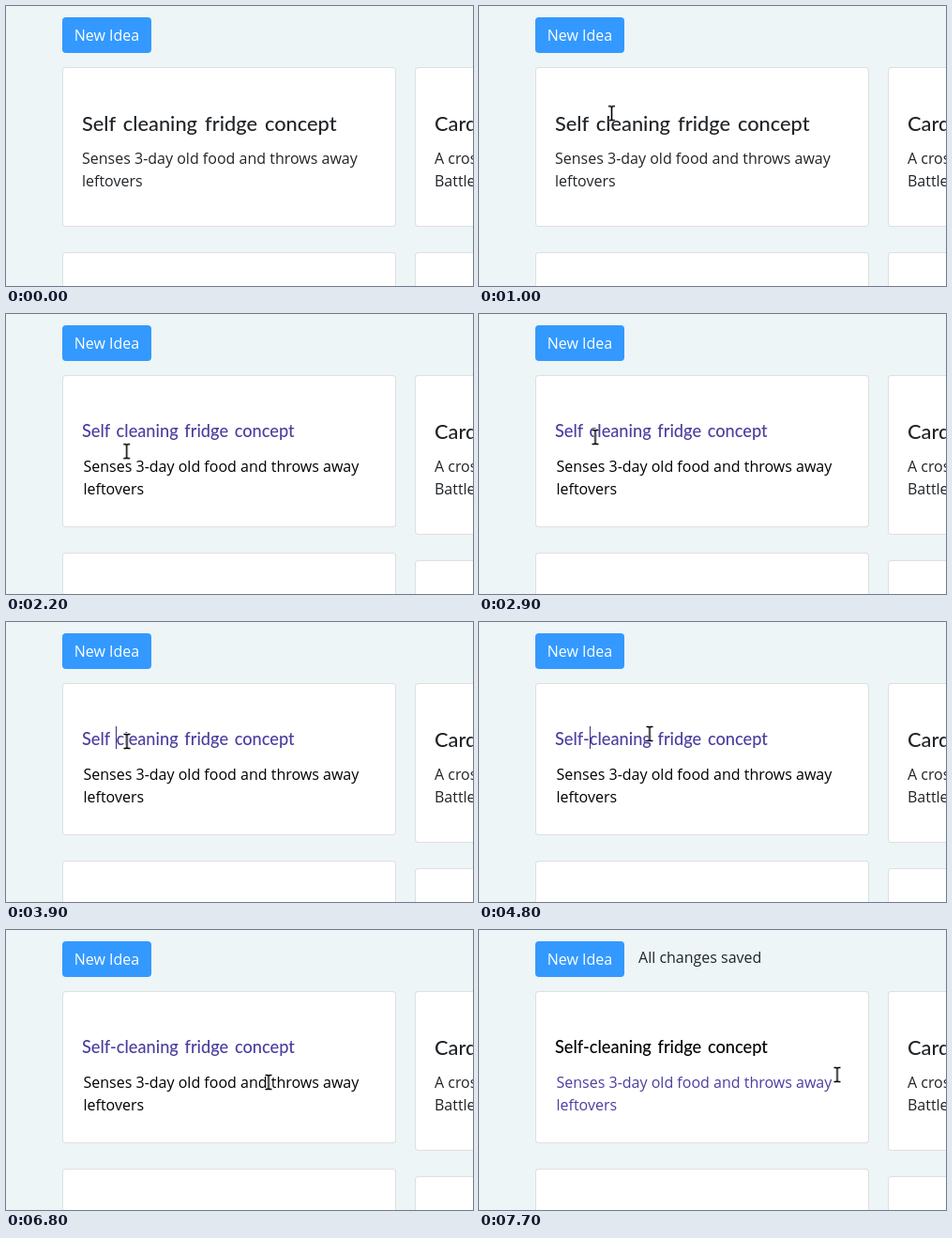
An HTML page for the animation above (8 s loop, 498 by 298 pixels).

```html
<!DOCTYPE html>
<html lang="en">
<head>
<meta charset="utf-8">
<title>Idea board</title>
<style>
html, body { margin: 0; width: 100%; height: 100%; overflow: hidden; background: #edf5f7; }
body { position: relative; font: 16px/24px "Open Sans", "Noto Sans", sans-serif; color: #212529; }
body *, .abs { position: absolute; box-sizing: border-box; white-space: nowrap; }

.button { left: 60px; top: 12px; width: 95px; height: 38px; padding: 7px 0; border-radius: 4px;
  background: #3399ff; color: #fff; text-align: center; }
.status { left: 170px; top: 17px; }
.card { left: 60px; top: 65px; width: 356px; height: 170px; background: #fff;
  border: 1px solid rgba(0, 0, 0, .125); border-radius: 4px; }
.right { left: 436px; }
.lower { top: 262px; }
.title, .field { font-family: Lato, "Open Sans", sans-serif; font-weight: 500; }
.title { left: 81px; top: 110px; font-size: 21.8px; line-height: 29px; word-spacing: 2.5px; }
.field { left: 81px; top: 112px; font-size: 18.2px; line-height: 24px; word-spacing: 2.1px; color: #4a3f9f; }
.text { left: 81px; top: 150px; }
.area { left: 82.5px; color: #000; }
.title.second, .text.second { left: 457px; }
.caret { left: 0; top: 111px; width: 1px; height: 24px; background: #352c7d; }
.pointer { left: -4.5px; top: -9px; width: 9px; height: 18px; }

/* One 8 s clock: 1.25% is a tenth of a second. */
.view, .edit, .spaced, .joined, .hyphened, .status, .caret, .pointer, .card.first, .card.below, .area {
  animation: 8s step-end infinite; }
.view { animation-name: view; }
.edit { animation-name: edit; }
.spaced { animation-name: spaced; }
.joined { animation-name: joined; }
.hyphened { animation-name: hyphened; }
.status { animation-name: saved; }
.caret { animation-name: caret; }
.pointer { animation-name: pointer; }
.card.first { animation-name: shrink; }
.card.below { animation-name: rise; }
.area { animation-name: edit, focus; }

@keyframes view { 0% { visibility: visible } 21.25%, 100% { visibility: hidden } }
@keyframes edit { 0% { visibility: hidden } 21.25%, 100% { visibility: visible } }
@keyframes spaced { 0%, 56.25%, 100% { visibility: hidden } 21.25% { visibility: visible } }
@keyframes joined { 0%, 60%, 100% { visibility: hidden } 56.25% { visibility: visible } }
@keyframes hyphened {
  0% { visibility: hidden; color: #4a3f9f }
  60% { visibility: visible; color: #4a3f9f }
  88.75%, 100% { visibility: visible; color: #000 }
}
@keyframes focus { 0% { color: #000 } 88.75%, 100% { color: #4a3f9f } }
@keyframes saved { 0% { visibility: hidden } 90%, 100% { visibility: visible } }
@keyframes shrink { 0% { height: 170px } 21.25%, 100% { height: 162px } }
@keyframes rise { 0% { top: 262px } 21.25%, 100% { top: 254px } }

@keyframes caret {
  0%, 27.5%, 53.75%, 67.5%, 81.25%, 100% { opacity: 0; transform: translateX(0) }
  21.25% { opacity: 1; transform: translateX(303px) }
  46.25% { opacity: 1; transform: translateX(117px) }
  56.25% { opacity: 1; transform: translateX(111px) }
  60%, 75% { opacity: 1; transform: translateX(118px) }
}

@keyframes pointer {
  0% { transform: translate(-40px, 132px) }
  2.5% { transform: translate(462.5px, 132px); animation-timing-function: steps(2) }
  5% { transform: translate(113.5px, 177px) }
  6.25% { transform: translate(113.5px, 177px); animation-timing-function: steps(3) }
  10% { transform: translate(145.5px, 111px) }
  11.25% { transform: translate(145.5px, 111px); animation-timing-function: steps(4) }
  16.25% { transform: translate(127.5px, 124px) }
  21.25% { transform: translate(127.5px, 124px); animation-timing-function: steps(7) }
  30% { transform: translate(128.5px, 155px) }
  31.25% { transform: translate(128.5px, 155px); animation-timing-function: steps(2) }
  33.75% { transform: translate(123.5px, 131px) }
  36.25% { transform: translate(123.5px, 131px) }
  37.5% { transform: translate(123.5px, 120px) }
  40% { transform: translate(123.5px, 120px); animation-timing-function: steps(4) }
  45% { transform: translate(115.5px, 129px) }
  48.75% { transform: translate(128.5px, 127px); animation-timing-function: steps(2) }
  51.25% { transform: translate(181.5px, 119px) }
  66.25% { transform: translate(181.5px, 119px); animation-timing-function: steps(2) }
  68.75% { transform: translate(186.5px, 182px) }
  72.5% { transform: translate(201.5px, 170px); animation-timing-function: steps(5) }
  78.75% { transform: translate(327.5px, 158px); animation-timing-function: steps(3) }
  82.5% { transform: translate(265.5px, 170px); animation-timing-function: steps(2) }
  85% { transform: translate(279.5px, 162px) }
  91.25% { transform: translate(279.5px, 162px); animation-timing-function: steps(4) }
  96.25%, 100% { transform: translate(381.5px, 154px) }
}
</style>
</head>
<body>
<div class="button">New Idea</div>
<div class="status">All changes saved</div>

<div class="card first"></div>
<div class="card right"></div>
<div class="card lower below"></div>
<div class="card lower right"></div>

<div class="title view">Self cleaning fridge concept</div>
<div class="text view">Senses 3-day old food and throws away<br>leftovers</div>
<div class="title second">Card</div>
<div class="text second">A cross<br>Battle</div>

<div class="field spaced">Self cleaning fridge concept</div>
<div class="field joined">Selfcleaning fridge concept</div>
<div class="field hyphened">Self-cleaning fridge concept</div>
<div class="text area">Senses 3-day old food and throws away<br>leftovers</div>

<div class="caret"></div>
<svg class="pointer" viewBox="0 0 9 18" fill="none">
  <path id="beam" d="M1.5 1.5H3.5L4.5 2.5L5.5 1.5H7.5M4.5 2.5V15.5M1.5 16.5H3.5L4.5 15.5L5.5 16.5H7.5" stroke="#fff" stroke-width="3"/>
  <use href="#beam"/>
  <path d="M1 1.5H3.5L4.5 2.5L5.5 1.5H8M4.5 2.5V15.5M1 16.5H3.5L4.5 15.5L5.5 16.5H8" stroke="#000" stroke-width="1.6"/>
</svg>
</body>
</html>
```
